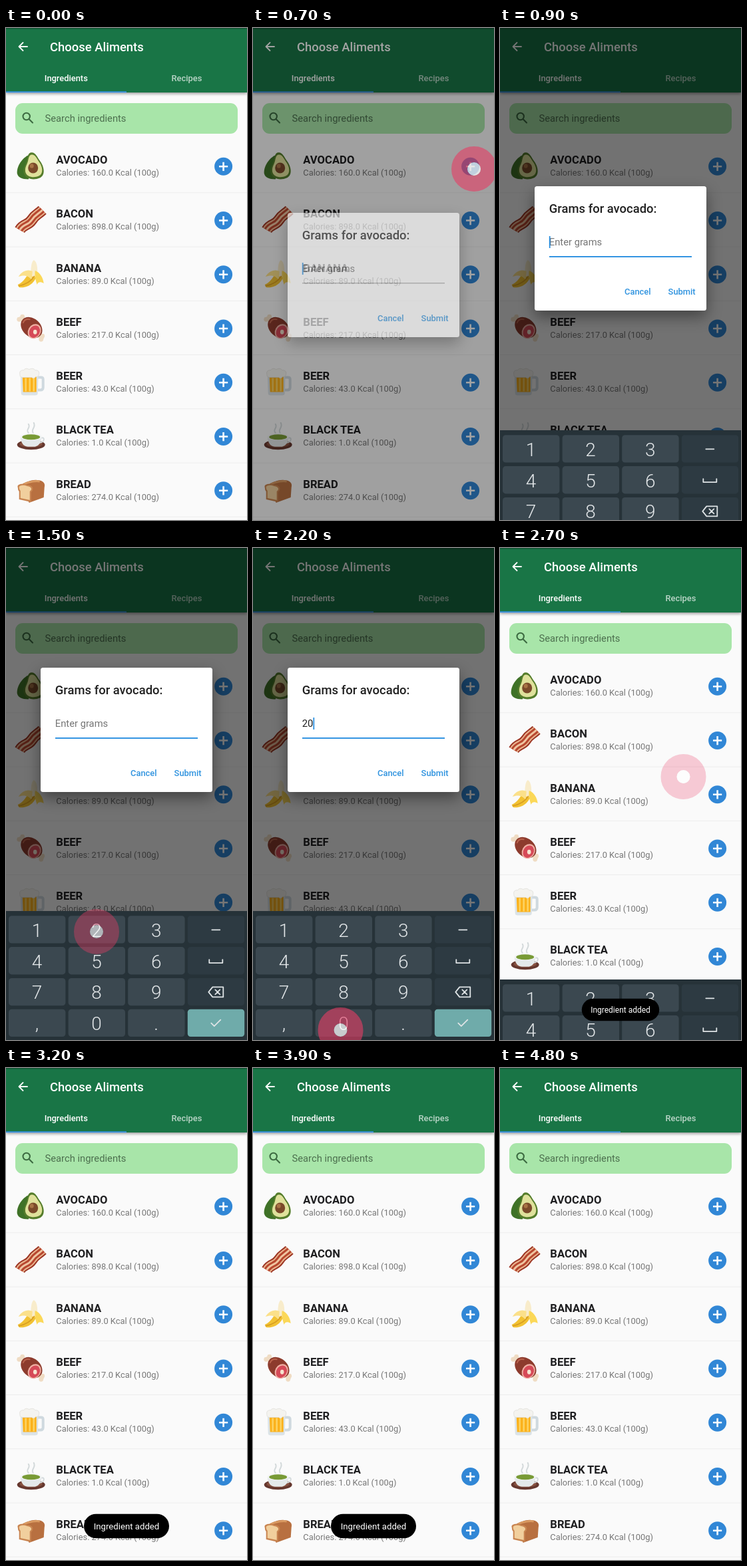
Animation, 362 px wide and 740 px high, one loop 5000 ms. Source, as an HTML page:

```html
<!DOCTYPE html>
<html lang="en">
<head>
<meta charset="utf-8">
<title>Choose Aliments</title>
<style>
  html, body { margin: 0; width: 100%; height: 100%; overflow: hidden; background: #fafafa; }
  svg { display: block; width: 362px; height: 740px; font-family: Roboto, sans-serif; }
  .mid { text-anchor: middle; }
  .medium { font-weight: 500; }
  .line { fill: none; stroke-linecap: round; stroke-linejoin: round; }
  #panel { filter: drop-shadow(0 9px 11px rgba(0, 0, 0, .42)); }
  #bar { filter: drop-shadow(0 2px 2px rgba(0, 0, 0, .38)); }
</style>
</head>
<body>
<svg viewBox="0 0 362 740">
  <rect width="362" height="740" fill="#fafafa"/>
  <g id="list"></g>

  <rect x="14" y="113" width="334" height="46" rx="11" fill="#a8e5a9"/>
  <g class="line" stroke="#3c6a41" stroke-width="2.1">
    <circle cx="30.7" cy="133" r="5.2"/><path d="M34.8 137.2L40 142.4"/>
  </g>
  <text x="58.5" y="140.5" font-size="14.75" fill="#4d704f">Search ingredients</text>

  <rect id="bar" width="362" height="97" fill="#197546"/>
  <rect width="362" height="1.5" fill="#115534"/>
  <path class="line" d="M32 28H20M25.5 22L19.5 28L25.5 34" stroke="#fff" stroke-width="1.8"/>
  <text x="66" y="34.5" font-size="18.43" class="medium" fill="#fff">Choose Aliments</text>
  <text x="90.3" y="79.5" font-size="12.9" class="mid medium" fill="#fff">Ingredients</text>
  <text x="271.5" y="79.5" font-size="12.9" class="mid medium" fill="#fff" fill-opacity=".7">Recipes</text>
  <rect y="95.3" width="181" height="1.9" fill="#3b93e6"/>

  <rect id="scrim" width="362" height="740"/>

  <g id="dialog">
    <rect id="panel" x="52" width="258" height="187" rx="3.5" fill="#fff"/>
    <text x="73.8" y="39.5" font-size="18.43" class="medium" fill="#212121">Grams for avocado:</text>
    <text id="hint" x="73.8" y="89" font-size="14.75" fill="#757575">Enter grams</text>
    <text id="value" x="73.8" y="89" font-size="14.75" fill="#212121"></text>
    <rect id="caret" y="75" width="1.8" height="18" fill="#2a8fe0"/>
    <rect id="underline" x="74" width="214"/>
    <g font-size="12.9" class="medium" fill="#2f93df">
      <text x="187" y="162.5">Cancel</text><text x="252.6" y="162.5">Submit</text>
    </g>
  </g>

  <g id="keyboard"><rect width="362" height="194" fill="#263238"/></g>

  <g id="toast">
    <rect x="-64" y="-18.3" width="128" height="36.6" rx="18.3" fill="#000"/>
    <text y="4.7" font-size="13.2" class="mid" fill="#fff">Ingredient added</text>
  </g>

  <g id="touch">
    <circle id="ring" r="22" fill="none" stroke="#e63c64" stroke-width="24"/>
    <circle id="dot" r="10" fill="#fff"/>
  </g>
</svg>
<script>
const $ = id => document.getElementById(id);
const set = (id, attrs) => { for (const k in attrs) $(id).setAttribute(k, attrs[k]); };

// Food pictures, each drawn around its own centre.
const half = 'M-1-20C6-22 9-14 13-8C20 1 22 14 13 18C4 22-9 20-11 10C-12 1-7-3-6-10C-5-15-4-19-1-20Z';
const strip = 'M-17 15C-11 5-5 9 1 0S10-8 17-15';
const bacon = [[17, '#9c3524'], [13, '#eab48e'], [9, '#b8472f'], [3, '#efc4a0']]
  .map(([w, c]) => `<path d="${strip}" fill="none" stroke="${c}" stroke-width="${w}"/>`).join('');
const foods = [
  ['AVOCADO', '160.0', `
    <path d="M1-18C-12-15-22 0-21 11C-20 17-14 20-4 20L6-6Z" fill="#3f7227"/>
    <path d="${half}" fill="#557d2b"/>
    <path d="${half}" fill="#dfe19b" transform="translate(.6 0) scale(.84)"/>
    <ellipse cx="3" cy="3" rx="7.5" ry="8" fill="#7b4a2a"/>
    <ellipse cx="1" cy="0" rx="3" ry="3.2" fill="#a87345"/>`],
  ['BACON', '898.0', bacon],
  ['BANANA', '89.0', `
    <path d="M-20 16C-10 12-7 2-1-4L9-2C8 12-4 22-18 20Z" fill="#f2c233"/>
    <path d="M-2 3C1-8-1-17 4-21C10-18 10-6 9 5Z" fill="#f8eccb"/>
    <path d="M6-5C14-2 18 6 19 14C14 11 10 12 9 16C7 10 5 4 6-5Z" fill="#fbd858"/>
    <path d="M2-4C-6-8-14-4-19 4C-11 1-4 2 1 9Z" fill="#fbe08a"/>
    <path d="M-19 18C-8 16 0 11 5 3" fill="none" stroke="#d79d22" stroke-width="1.5"/>`],
  ['BEEF', '217.0', `
    <path class="line" d="M-16-14L16 15" stroke="#efdcc4" stroke-width="6"/>
    <g fill="#efdcc4"><circle cx="-18" cy="-13" r="3.4"/><circle cx="-13" cy="-17" r="3.4"/>
    <circle cx="17" cy="12" r="3.4"/><circle cx="15" cy="17" r="3.4"/></g>
    <ellipse cx="0" cy="-1" rx="18" ry="13.5" fill="#8d3b2d" transform="rotate(42)"/>
    <ellipse cx="5" cy="5" rx="9.5" ry="11.5" fill="#f0b0a4" transform="rotate(30 5 5)"/>
    <ellipse cx="5.3" cy="5.3" rx="7.7" ry="9.7" fill="#d64a58" transform="rotate(30 5 5)"/>
    <ellipse cx="6" cy="6" rx="2.8" ry="3.4" fill="#f6e4cf"/>
    <path class="line" d="M-12-8C-10-13-6-14-2-13" stroke="#b8624c" stroke-width="2"/>`],
  ['BEER', '43.0', `
    <path d="M10-7H15Q18-7 18-4V8Q18 12 14 12H10" fill="none" stroke="#cfd9df" stroke-width="4"/>
    <path d="M-16-14H11L10 17Q10 20 6 20H-11Q-15 20-15 17Z" fill="#dbe3e7"/>
    <path d="M-13-9H8V15H-12Z" fill="#fbb21c"/>
    <path d="M-8-6V14M-2-6V14M4-6V14" stroke="#fdd466" stroke-width="2.4"/>
    <path d="M-17-12Q-18-18-11-18Q-8-22-3-19Q3-22 6-18Q13-18 12-12Q11-7 7-8Q4-4 1-7H-13Q-17-7-17-12Z" fill="#f4f3ef" stroke="#dddcd6" stroke-width=".7"/>`],
  ['BLACK TEA', '1.0', `
    <ellipse cy="13" rx="21" ry="7.5" fill="#65372e"/><ellipse cy="12" rx="17" ry="5" fill="#86503f"/>
    <path d="M13 3Q20 1 19 6Q18 10 11 10" fill="none" stroke="#d5dbdd" stroke-width="2"/>
    <path d="M-16 1Q-15 15-5 16H6Q15 14 16 1Z" fill="#e4e9ea"/>
    <ellipse cy="1" rx="16" ry="5.4" fill="#f3f5f5"/><ellipse cy="1.5" rx="13.5" ry="4" fill="#789a35"/>
    <path class="line" d="M-4-5C-9-10 0-12-4-18M3-5C-1-10 8-13 4-20" stroke="#d3d9da" stroke-width="2"/>`],
  ['BREAD', '274.0', `
    <path d="M-16-7C-8-13 3-16 9-15C17-15 22-11 20-4L19 11L-3 19Z" fill="#b87040"/>
    <path d="M-11-9C-2-13 8-14 13-13" fill="none" stroke="#d99a62" stroke-width="3"/>
    <path d="M-20-4C-22-10-11-10-6-8C3-8 5-1 0 3V18L-18 14V2Q-20 0-20-4Z" fill="#c88450"/>
    <path d="M-18-4C-18-8-10-8-6-6C1-5 2-1-2 2V15L-16 12V1Q-18-1-18-4Z" fill="#f1cf9d"/>`]
];
$('list').innerHTML = foods.map(([name, kcal, art], i) => `
  <g transform="translate(0 ${i * 81.25})">
    <g transform="translate(37.7 207.5)">${art}</g>
    <text x="75.3" y="204" font-size="16.6" font-weight="700" fill="#1f1f21">${name}</text>
    <text x="75.3" y="222" font-size="12.9" fill="#777">Calories: ${kcal} Kcal (100g)</text>
    <circle cx="326.6" cy="208.3" r="13.5" fill="#3187d6"/>
    <path d="M320 208.3H333.2M326.6 201.7V214.9" stroke="#fff" stroke-width="2.6"/>
    <rect y="247.3" width="362" height="1" fill="#ededed"/>
  </g>`).join('');

// Numeric keypad; the last column holds icons.
const icons = [
  'M-6 0H6',
  'M-10-2V3H10V-2',
  'M-5-7.5H11V7.5H-5L-11 0ZM-1-3.5L6 3.5M6-3.5L-1 3.5',
  'M-7 0L-2.5 4.5L7-5'
];
const keyRows = ['123', '456', '789', ',0.'];
let keys = '';
keyRows.forEach((row, r) => {
  for (let c = 0; c < 4; c++) {
    const x = 4 + c * 89.6, y = 7.3 + r * 46.8;
    const fill = c < 3 ? '#3b4850' : r < 3 ? '#2d3a42' : '#6fabaa';
    keys += `<rect x="${x}" y="${y}" width="85.4" height="41.3" rx="4.5" fill="${fill}"/>
      <g transform="translate(${x + 42.5} ${y + 21})">` + (c < 3
        ? `<text y="10.5" font-size="28" font-weight="300" class="mid" fill="#e3e7e9">${row[c]}</text>`
        : `<path class="line" d="${icons[r]}" stroke="#dfe4e6" stroke-width="1.8"/>`) + '</g>';
  }
});
$('keyboard').innerHTML += keys;

// Linear interpolation through [time, value] points.
function track(t, ...points) {
  let [t0, v0] = points[0];
  for (const [t1, v1] of points) {
    if (t < t1) return t <= t0 ? v0 : v0 + (v1 - v0) * (t - t0) / (t1 - t0);
    [t0, v0] = [t1, v1];
  }
  return v0;
}

const taps = [[600, 332, 212], [1500, 136, 577], [2100, 131.5, 725], [2500, 275.5, 344]];

function draw(t) {
  set('scrim', { opacity: track(t, [600, 0], [700, .36], [800, .54], [2500, .54], [2700, 0]) });

  const lift = track(t, [700, 0], [800, 6], [900, 40], [1000, 84], [1100, 96], [1200, 98]);
  set('dialog', {
    opacity: track(t, [600, 0], [700, .62], [800, 1], [2500, 1], [2600, .4], [2700, 0]),
    transform: `translate(0 ${278 - lift})`
  });
  const text = t < 1600 ? '' : t < 2200 ? '2' : '20';
  const typed = t < 1600 ? 700 : t < 2200 ? 1600 : 2200;
  const focused = t >= 800;
  $('value').textContent = text;
  set('hint', { opacity: text ? 0 : 1 });
  set('caret', { x: 73.8 + text.length * 8.3, opacity: (t - typed) % 1000 < 500 ? 1 : 0 });
  set('underline', {
    y: focused ? 105 : 105.3,
    height: focused ? 1.9 : 1,
    fill: focused ? '#2a8fe0' : '#8a8a8a'
  });

  const shown = track(t, [700, 0], [800, 45], [900, 135], [1000, 184], [1100, 194],
    [2600, 194], [2700, 91], [2800, 0]);
  set('keyboard', { transform: `translate(0 ${740 - shown})` });

  const pop = track(t, [2700, 0], [2800, 1]);
  set('toast', {
    opacity: track(t, [2600, 0], [2700, 1], [4500, 1], [4700, 0]),
    transform: `translate(181 ${694.5 - 5.5 * pop}) scale(${.91 + .09 * pop})`
  });

  const tap = taps.find(([start]) => t >= start && t < start + 300);
  set('touch', { opacity: tap ? 1 : 0 });
  if (tap) {
    const age = t - tap[0];
    set('touch', { transform: `translate(${tap[1]} ${tap[2]})` });
    set('ring', { opacity: track(age, [0, .4], [100, .6], [200, .26]) });
    set('dot', { opacity: track(age, [0, .6], [100, .72], [200, .6]) });
  }
}

const begin = performance.now();
function tick() {
  draw(Math.floor((performance.now() - begin) % 5000 / 100) * 100);
  requestAnimationFrame(tick);
}
tick();
</script>
</body>
</html>
```
